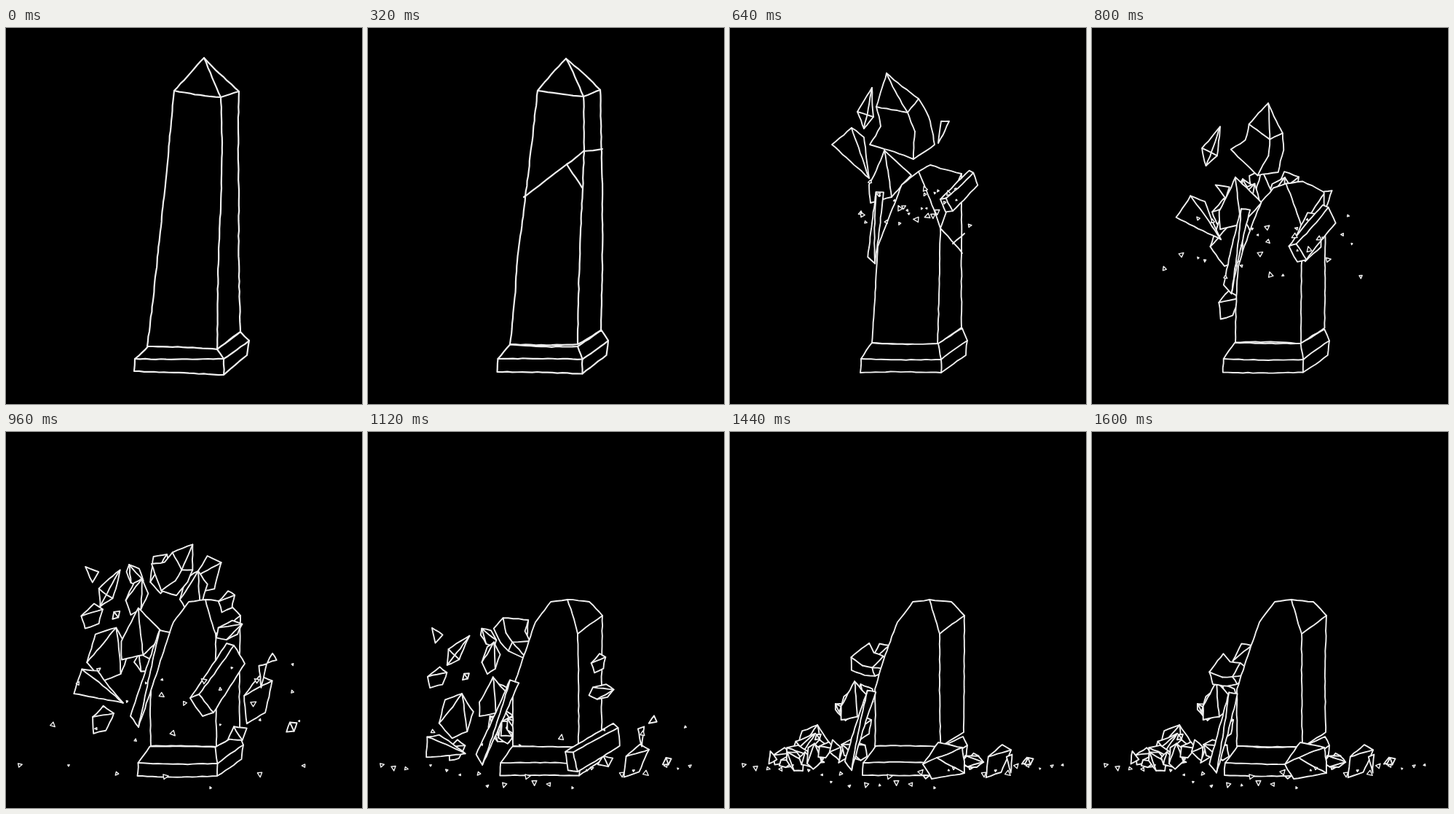
Write an HTML page with a canvas that moves like this. It is 489 px wide and 516 px high and loops after 1.68 s.

```html
<!DOCTYPE html>
<html lang="en">
<head>
<meta charset="utf-8">
<title>Falling obelisk</title>
<style>
html, body { margin: 0; width: 100%; height: 100%; overflow: hidden; background: #000; }
canvas { display: block; }
</style>
</head>
<body>
<canvas id="stage" width="489" height="516"></canvas>
<script>
const ctx = document.getElementById('stage').getContext('2d');
const STEP = 80, STEPS = 21;
const SPEED = 37, GRAVITY = 5.2;   // pixels per step, and per step squared
const scene = [];
let step = 0;

const rand = (a, b) => {
  const v = Math.sin(a * 127.1 + b * 311.7 + 7) * 43758.5453;
  return v - Math.floor(v);
};
const spread = (a, b, size) => (rand(a, b) - 0.5) * 2 * size;
const mix = (a, b, t) => a + (b - a) * t;
const mixAll = (p, q, t) => p.map((v, i) => mix(v, q[i], t));
const clamp = v => Math.max(0, Math.min(1, v));
const parse = s => s.split(' ').filter(Boolean).map(p => p.split(',').map(Number));

function centre(pts) {
  const sum = pts.reduce((s, p) => [s[0] + p[0], s[1] + p[1]], [0, 0]);
  return sum.map(v => v / pts.length);
}

function local(pts) {
  const [cx, cy] = centre(pts);
  return pts.map(([x, y]) => [x - cx, y - cy]);
}

function place(pts, [x, y, turn = 0, scale = 1]) {
  const c = Math.cos(turn) * scale, s = Math.sin(turn) * scale;
  return pts.map(([u, v]) => [x + u * c - v * s, y + u * s + v * c]);
}

function add(n, inner, at) {
  scene.push({ n, inner: inner.split(' ').filter(Boolean), at });
}

// Keyed piece: a pose is a list of corners, or one entry "x,y,turn,scale"
// that carries the nearest earlier shape.
function keyed(n, inner, poses, end = STEPS) {
  const keys = Object.keys(poses).map(Number);
  const lists = keys.map(k => parse(poses[k]));
  let shape = local(lists.find(l => l.length > 1));
  const states = lists.map(list => {
    if (list.length > 1) shape = local(list);
    const [x, y, turn = 0, scale = 1] = list.length > 1 ? centre(list) : list[0];
    return { shape, spot: [x, y, turn, scale] };
  });
  add(n, inner, k => {
    if (k < keys[0] || k >= end) return null;
    const i = keys.filter(key => key <= k).length - 1;
    const a = states[i], b = states[i + 1] || a;
    const t = b === a ? 0 : (k - keys[i]) / (keys[i + 1] - keys[i]);
    return place(a.shape.map((p, j) => mixAll(p, b.shape[j], t)), mixAll(a.spot, b.spot, t));
  });
}

// The heap leans on the left side of the stump; elsewhere lies flat ground
const heap = x => x < 225 ? 452 - 150 * Math.max(0, (x - 50) / 160) ** 2 : 452;

// Thrown out of the column to `mid`, then falls and comes to rest
function falling(shape, inner, mid, id, { launch, home, start = 8, peak = 12 } = {}) {
  const [x, y] = mid;
  const drift = (x - 235) * 0.1, spin = spread(id, 5, 0.14);
  const rest = Math.max(y, heap(x + drift * 3));
  const fall = (Math.sqrt(SPEED ** 2 + 2 * GRAVITY * (rest - y)) - SPEED) / GRAVITY;
  const hidden = home || [mix(255, x, 0.1), Math.max(250, y - 30)];
  if (launch) start = 6;
  add(shape.length, inner, k => {
    if (k < start) return null;
    const d = Math.min(k - peak, fall);
    let spot;
    if (d > 0) spot = [x + drift * d, y + SPEED * d + GRAVITY * d * d / 2];
    else if (launch && k < 8) spot = mixAll(hidden, launch, (k - 6) / 2);
    else if (launch) spot = mixAll(launch, mid, (k - 8) / 4);
    else spot = mixAll(hidden, mid, clamp((k - start) / (peak - start)));
    const turn = spin * (Math.min(k, peak + fall) - 8);
    return place(shape, [...spot, turn, 1 - 0.25 * clamp(d / (fall || 1))]);
  });
}

function chip([x, y, size], id, options) {
  const n = size < 30 ? 3 + id % 2 : 5 + id % 2;
  const wide = 0.26 + rand(id, 1) * 0.14;
  const points = Array.from({ length: n }, (_, i) => {
    const a = (i + spread(id, 20 + i, 0.2)) / n * Math.PI * 2;
    return [Math.cos(a) * size * 0.53, Math.sin(a) * size * wide];
  });
  const shape = place(points, [0, 0, Math.PI / 2 + spread(id, 2, 0.6)]);
  falling(shape, n < 4 ? '' : n < 6 ? '13' : '13 35', [x, y], id, options);
}

// A broken piece with its own outline, already in the air at step 8
function flake(outline, inner, mid, id) {
  const pts = parse(outline);
  falling(local(pts), inner, mid, id, { launch: centre(pts), home: [250, 240] });
}

// Whole monument
keyed(8, '08 18 78 89 94', {
  0: '272,41 320,87 320,230 322,417 290,441 194,437 206,335 231,86 295,95 296,220',
  4: '272,42 319,85 322,235 320,415 288,434 195,434 205,320 233,86 296,94 295,220'
}, 6);

// Pieces behind the stump; the cloud gives x, y and size at its widest
parse('277,196,54 258,222,60 213,193,54 177,197,32 191,318,34 180,226,50 118,253,36 ' +
  '140,305,72 132,395,42 151,251,14 117,193,26').forEach((c, i) => chip(c, i));
flake('212,168 191,215 193,240 222,232 249,202', '03', [181,285], 31);
flake('195,82 175,115 184,138 197,122', '02 13', [140,218], 32);
flake('167,137 140,160 191,206 184,150', '02', [121,346], 33);
keyed(8, '08 18 78 89 94', {
  6: '255,105,.15,1.05',
  8: '215,62 201,108 207,135 192,160 252,180 281,160 273,122 259,97 244,116 254,142',
  12: '233,191,.9,.62', 14: '200,281,2.9,.55', 16: '196,304,2.4,.5', 20: '188,331,1.9,.5'
});
for (let i = 0; i < 9; i++) {
  chip([80 + i * 13, 447 - rand(i, 8) * i * 5, 26 + rand(i, 9) * 22], 50 + i,
    { start: 13, peak: 16, home: [225, 390] });
}

// Stump and plinth
keyed(9, '49 96 98', {
  6: '195,432 203,300 236,215 247,206 259,197 275,188 318,200 318,411 285,434 289,275',
  8: '195,432 203,300 236,215 247,206 259,197 275,188 318,200 318,411 285,434 289,275',
  12: '199,431 199,353 230,261 251,233 274,230 304,233 322,252 321,412 289,432 288,277'
});
keyed(8, '78 83 85 18', {
  0: '195,437 290,441 322,417 334,429 331,449 299,476 176,471 177,454 299,454',
  8: '195,432 286,433 319,412 326,429 324,449 290,473 179,473 180,454 290,455',
  16: '200,431 289,432 320,418 326,430 323,449 290,471 182,471 183,454 291,455'
});

// Pieces in front
keyed(4, '02', {
  6: '225,270,0,.5', 8: '200,272,-.2,.72', 12: '211,272 225,275 182,405 171,390',
  14: '177,396,.1,.9', 16: '177,404,.02,.82', 20: '180,410,-.06,.82'
});
parse('345,367,68 318,414,28 303,233,30 306,272,38 366,311,18 392,405,18')
  .forEach((c, i) => chip(c, 40 + i, { start: 10, home: [300, 285] }));
flake('290,128 301,128 286,158', '', [352, 330], 34);
keyed(6, '06 62 64', {
  6: '308,205,.2,.5', 8: '313,226,.2,.62',
  12: '253,365 303,290 313,293 328,318 285,385 270,390 265,360', 14: '306,435,.45,.85',
  16: '265,456 286,426 319,433 322,452 322,468 277,476 284,447'
});

const crack = parse('214,232 273,187 296,169 322,166');
const splits = ['289,275 319,309', '306,296 322,282'].map(parse);

// Rough chalk line from p to q, bent a little differently in every step
function chalk(p, q, seed) {
  const length = Math.hypot(q[0] - p[0], q[1] - p[1]);
  const bits = Math.max(1, Math.round(length / 7));
  const bend = spread(seed, step, Math.min(1.5, length / 50));
  const nx = (p[1] - q[1]) / (length || 1), ny = (q[0] - p[0]) / (length || 1);
  for (let i = 1; i <= bits; i++) {
    const t = i / bits;
    const off = i === bits ? 0 : Math.sin(t * Math.PI) * bend + spread(seed + i * 3, step, 0.45);
    ctx.lineTo(mix(p[0], q[0], t) + nx * off, mix(p[1], q[1], t) + ny * off);
  }
}

function polygon(pts, seed) {
  ctx.beginPath();
  ctx.moveTo(...pts[0]);
  pts.forEach((p, i) => chalk(p, pts[(i + 1) % pts.length], seed + i));
  ctx.closePath();
  ctx.fill();
  ctx.stroke();
}

function segment(p, q, seed) {
  ctx.beginPath();
  ctx.moveTo(...p);
  chalk(p, q, seed);
  ctx.stroke();
}

function drawPiece({ n, inner, at }, id) {
  const pts = at(step);
  if (!pts) return;
  const seed = id * 23;
  polygon(pts.slice(0, n), seed);
  inner.forEach(([a, b], i) => segment(pts[a], pts[b], seed + 12 + i));
}

function drawCracks() {
  if (step < 6) {
    for (let i = 0; i < 3; i++) {
      const t = clamp(step * 0.75 - i);
      if (t) segment(crack[i], mixAll(crack[i], crack[i + 1], t), 800 + i);
    }
    if (step > 2) segment(crack[1], mixAll(crack[1], [294, 219], clamp((step - 2) / 2)), 810);
  } else if (step < 10) {
    splits.forEach(([p, q], i) => segment(p, q, 820 + i));
  }
}

function drawGravel() {
  const count = 28;
  for (let i = 0; i < count; i++) {
    const t = clamp((step - 6) / (6 + i % 4));
    if (!t) continue;
    const u = i / (count - 1);
    const x = mix(255 + spread(i, 1, 45), 24 + u * 434 + spread(i, 6, 6), t);
    const y = mix(190 + rand(i, 2) * 60, 457 + rand(i, 7) * 36 * Math.sin(u * Math.PI), t * t);
    const r = 1 + rand(i, 3) * 3.4, turn = rand(i, 4) * 6 + t * 5;
    polygon(place([[r, 0], [-r * 0.6, r * 0.8], [-r * 0.6, -r * 0.8]], [x, y, turn]), 900 + i);
  }
}

function draw() {
  step = Math.floor(performance.now() / STEP) % STEPS;
  ctx.fillStyle = '#000';
  ctx.fillRect(0, 0, 489, 516);
  ctx.strokeStyle = '#efefef';
  ctx.lineWidth = step < 6 ? 2.2 : 1.9;
  ctx.lineJoin = ctx.lineCap = 'round';
  scene.forEach(drawPiece);
  drawCracks();
  ctx.lineWidth = 1.4;
  drawGravel();
  requestAnimationFrame(draw);
}
draw();
</script>
</body>
</html>
```
